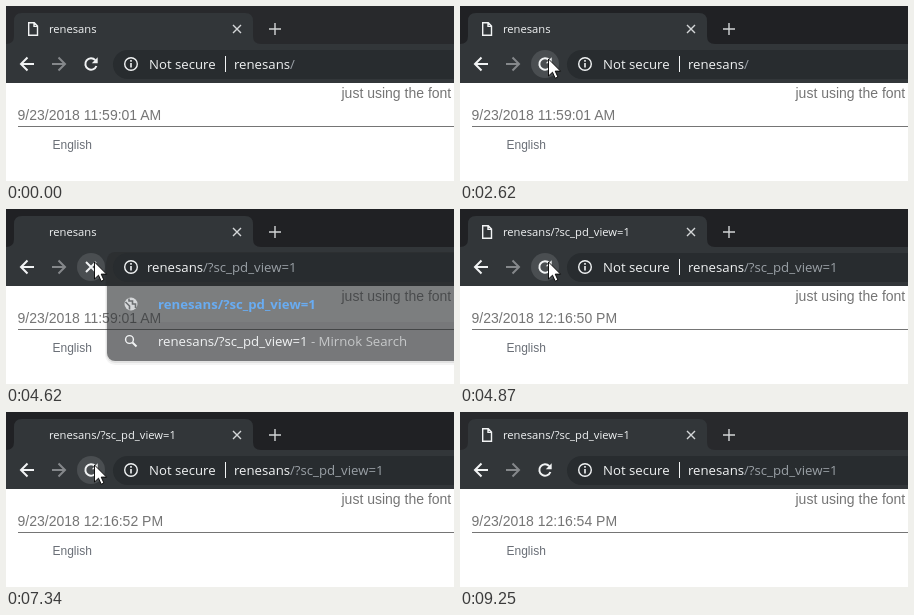
These frames come from a looping animation (448 px wide and 175 px high, 9400 ms). An HTML page:

```html
<!DOCTYPE html>
<html lang="en">
<head>
<meta charset="utf-8">
<title>Browser reload</title>
<style>
  html, body { margin: 0; width: 100%; height: 100%; overflow: hidden; background: #fff; }
  svg { display: block; width: 448px; height: 175px; }
  .ui { font: 13.2px "Open Sans", "Noto Sans", sans-serif; fill: #f1f3f4; }
  .title { font-size: 11.2px; }
  .page { font: 14px "Liberation Sans", Arial, sans-serif; fill: #757575; }
  .link { font-size: 12px; fill: #6a6f77; }
  .dim { fill: #9aa0a6; }
  .line { fill: none; stroke: #f1f3f4; stroke-width: 2; }
  .thin { stroke-width: 1.4; }
  .bold { font-weight: 700; fill: #69acf2; }
  text { white-space: pre; }
</style>
</head>
<body>
<svg viewBox="0 0 448 175">
  <rect width="448" height="175" fill="#fff"/>

  <!-- page -->
  <g class="page">
    <text x="335.5" y="92">just using the font</text>
    <text x="11.5" y="114" id="stamp"></text>
    <path d="M12 120.5H448" stroke="#757575"/>
    <text x="46.5" y="143" class="link" id="link">English</text>
  </g>

  <!-- tab strip -->
  <rect id="strip" width="448" height="39"/>
  <path d="M0 38q8 0 8-8V15q0-8 8-8H239q8 0 8 8V30q0 8 8 8V77H0zM0 38H448V77H0z" fill="#323639"/>
  <path id="file" class="line thin" d="M22.7 16.7h5.6l3.2 3.4v9.2h-8.8zM28 17v3.4h3.3"/>
  <text x="43" y="27" class="ui title" id="title"></text>
  <path class="line thin" stroke-opacity=".85" d="M227 19l8 8M235 19l-8 8"/>
  <path class="line thin" stroke-opacity=".85" d="M263 23h12M269 17v12"/>

  <!-- toolbar -->
  <path class="line" d="M28 58H15.5M21.5 51.5L15 58l6.5 6.5"/>
  <path class="line" style="stroke:#85888b" d="M46 58h12.5M52.5 51.5L59 58l-6.5 6.5"/>
  <circle id="halo" cx="85" cy="58" r="14" fill="#4a4e51"/>
  <g id="reload">
    <path class="line" d="M89.3 54.2A5.7 5.7 0 1 0 90.4 60"/>
    <path d="M91.7 51.3v5.9h-5.9z" fill="#f1f3f4"/>
  </g>
  <path id="stop" class="line" d="M80 53l10 10M90 53l-10 10"/>

  <!-- suggestions -->
  <g id="popup">
    <g id="sheet">
      <rect x="99" y="47" width="380" height="109" rx="10" fill="#000" opacity=".07"/>
      <rect x="100" y="45" width="380" height="109" rx="9" fill="#000" opacity=".12"/>
      <rect x="101" y="43" width="380" height="109" rx="8" fill="#292b2d"/>
      <rect x="101" y="77" width="380" height="36" fill="#313436"/>
    </g>
    <circle cx="125" cy="95" r="6.5" fill="#d5d7d9"/>
    <path d="M119.5 93l4 4v3.500M123 89.500v2.500h3.500v3h3v4" fill="none" stroke="#6b6e70" stroke-width="1.600"/>
    <circle class="line thin" cx="123.500" cy="130.500" r="3.900"/>
    <path class="line" d="M126.500 133.500l4 4"/>
    <text x="152" y="100" class="ui bold">renesans/?sc_pd_view=1</text>
    <text x="152" y="137" class="ui">renesans/?sc_pd_view=1<tspan fill="#c6c8c9"> - Mirnok Search</tspan></text>
  </g>

  <!-- address bar -->
  <rect id="bar" x="107" y="44" width="400" height="29" rx="14.5" fill="#282c2f" stroke="#56709a"/>
  <rect id="chip" x="109" y="46" width="111" height="24" rx="12" fill="#3d4144"/>
  <circle class="line thin" cx="125" cy="58" r="6.300"/>
  <path class="line" style="stroke-width:1.600" d="M125 57v4.500M125 54v1.700"/>
  <g id="secure">
    <text x="143" y="63" class="ui">Not secure</text>
    <path d="M219.500 50v16" stroke="#f1f3f4"/>
  </g>
  <rect id="select" x="228" y="47" width="61" height="22" fill="#0078d7"/>
  <text id="url" y="63" class="ui">renesans<tspan class="dim" id="path"></tspan></text>
  <path id="caret" stroke="#f1f3f4"/>

  <path id="mouse" d="M0 0V17l4-3.800 2.700 6 2.700-1.200-2.700-5.900H12z" fill="#fff" stroke="#000" stroke-width=".9"/>
</svg>

<script>
const LOOP = 9400;
const QUERY = '/?sc_pd_view=1';
const el = {};
document.querySelectorAll('[id]').forEach(node => el[node.id] = node);

const REST = [88, 53];
// start, end, steps, then four cubic control points
const trips = [
  [300, 910, 9, [380, 160], [120, 165], [40, 160], REST],
  [5260, 5710, 7, REST, [100, 105], [150, 105], [128, 65]],
  [5770, 6100, 5, [128, 65], [115, 61], [101, 57], REST],
  [8350, 8785, 7, REST, [20, 190], [180, 120], [340, 149]]
];
const loads = [[1220, 1380], [1920, 2080], [2530, 2620], [4620, 4870],
               [6460, 6560], [7340, 7500], [8100, 8200]];
const stamps = [[0, '11:59:01 AM'], [4790, '12:16:50 PM'], [6560, '12:16:52 PM'],
                [7430, '12:16:53 PM'], [8200, '12:16:54 PM']];

const within = (t, a, b) => t >= a && t < b;
const show = (node, on) => node.style.display = on ? '' : 'none';
const write = (node, text) => { if (node.textContent !== text) node.textContent = text; };

function cubic(p, u) {
  const v = 1 - u;
  return [0, 1].map(k => v * v * v * p[0][k] + 3 * v * v * u * p[1][k]
                       + 3 * v * u * u * p[2][k] + u * u * u * p[3][k]);
}

function pointer(t) {
  if (t < 300 || t >= 8860 || within(t, 4080, 4620)) return null;
  const trip = trips.filter(item => t >= item[0]).pop();
  const [start, end, steps, ...points] = trip;
  const i = Math.min(steps - 1, Math.floor((t - start) / (end - start) * (steps - 1) + 1e-6));
  return cubic(points, (i + 1) / steps);
}

function draw(t) {
  const at = pointer(t);
  const [x, y] = at || [-99, -99];
  const loaded = t >= 4790;
  const typed = within(t, 4080, 4790);
  const typing = within(t, 4080, 4620);
  const focused = within(t, 3380, 4170);
  const stopping = within(t, 4620, 4870);

  show(el.mouse, at);
  el.mouse.setAttribute('transform', `translate(${Math.round(x) + .5} ${Math.round(y)})`);
  show(el.halo, Math.hypot(x - 85, y - 58) < 14.5);
  show(el.chip, loaded && within(x, 108, 220) && within(y, 46, 71));
  el.link.style.textDecoration = within(x, 44, 92) && within(y, 124, 150) ? 'underline' : 'none';

  el.strip.setAttribute('fill', within(t, 1220, 9250) ? '#202124' : '#28292c');
  show(el.file, !loads.some(([a, b]) => within(t, a, b)));
  show(el.reload, !stopping);
  show(el.stop, stopping);
  write(el.title, 'renesans' + (loaded ? QUERY : ''));
  write(el.stamp, '9/23/2018 ' + stamps.filter(s => t >= s[0]).pop()[1]);

  show(el.popup, within(t, 4170, 4720));
  el.sheet.setAttribute('opacity', t < 4620 ? 1 : .63);
  el.bar.setAttribute('stroke-width', focused ? 2 : 0);
  show(el.secure, !typed);
  show(el.select, within(t, 3380, 3780));
  el.url.setAttribute('x', typed ? 141 : 228);
  write(el.path, typed || loaded ? QUERY : '/');
  el.path.style.fill = typing || within(t, 3380, 3780) ? '#f1f3f4' : '';
  show(el.caret, within(t, 3780, 4620));
  el.caret.setAttribute('d', `M${typed ? 292.5 : 288.5} 50v16`);
}

const begin = performance.now();
function tick() {
  draw((performance.now() - begin) % LOOP);
  requestAnimationFrame(tick);
}
tick();
</script>
</body>
</html>
```
